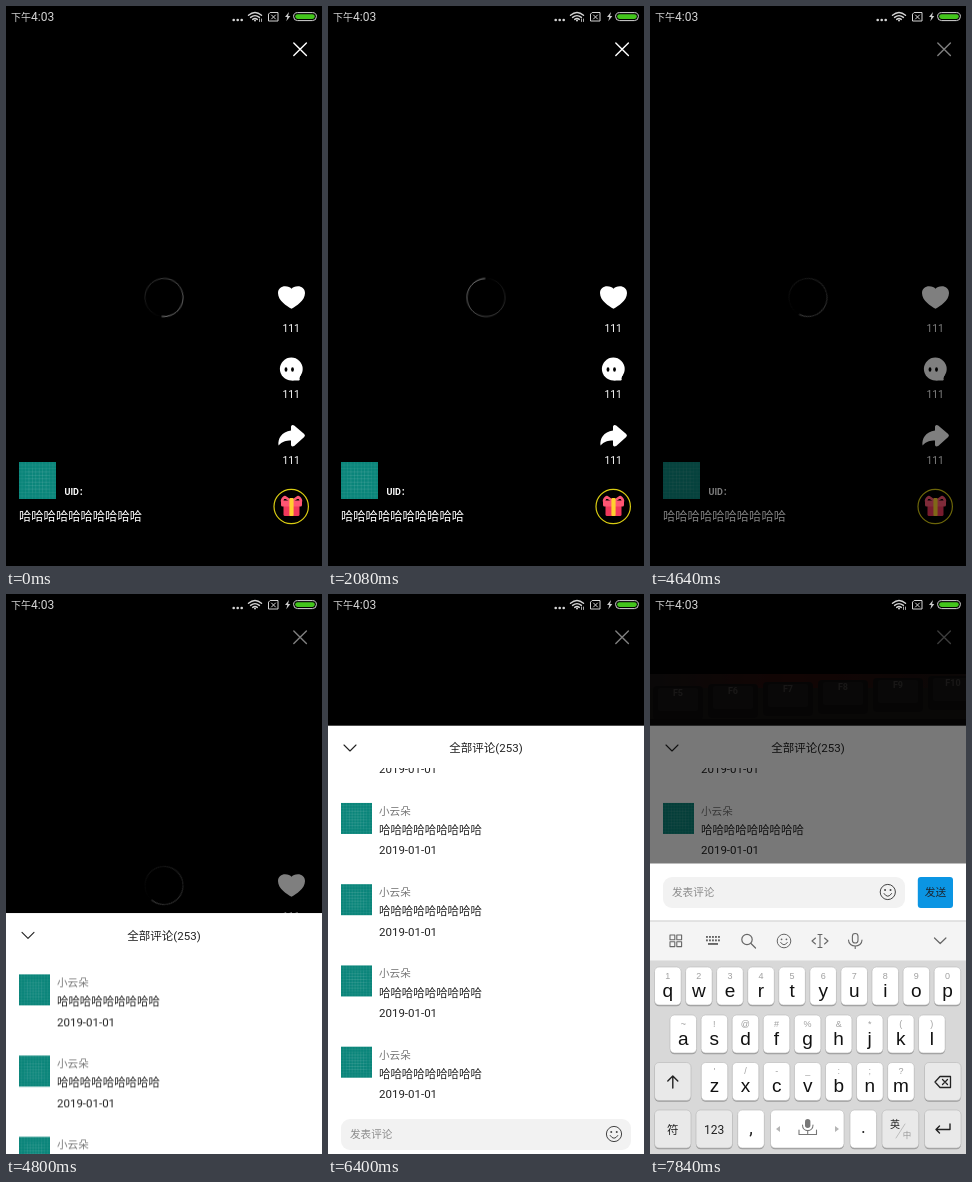
Animation, 316 px wide and 560 px high, one loop 8000 ms. Source, as an HTML page:

```html
<!DOCTYPE html>
<html lang="zh">
<head>
<meta charset="utf-8">
<title>Comments sheet</title>
<style>
html, body { margin: 0; width: 100%; height: 100%; overflow: hidden; background: #000; }
svg { display: block; width: 100%; height: 100%; }
text { font-family: Roboto, "Noto Sans CJK SC", "Noto Sans CJK", sans-serif; white-space: pre; }
.letters text { font-family: "Liberation Sans", sans-serif; }
.line { fill: none; stroke-linecap: round; stroke-linejoin: round; }
.spinner, .dim1, .dim2, .sheet, .list, .viewport, .panel, .keyboard, .caret, .video, .dots, .traffic {
  animation: 8s linear infinite;
}
.spinner { animation-name: spin; transform-origin: 158px 291.5px; }
.dim1 { animation-name: dim1; }
.sheet { animation-name: sheet; }
.list { animation-name: scroll; }
.viewport { animation-name: nudge; }
.keyboard { animation-name: keyboard; }
.dim2, .panel { animation-name: compose; }
.caret { animation-name: caret; }
.video { animation-name: video; }
.dots { animation-name: dots; }
.traffic { animation-name: traffic; }
@keyframes spin { from { transform: rotate(97deg); } to { transform: rotate(753deg); } }
@keyframes dim1 { 0%, 56.5% { opacity: 0; } 57.8%, 100% { opacity: .5; } }
@keyframes sheet {
  0%, 58.3% { transform: translateY(432px); animation-timing-function: cubic-bezier(.2, .6, .4, 1); }
  65.5%, 100% { transform: none; }
}
@keyframes scroll {
  0%, 72% { transform: none; animation-timing-function: cubic-bezier(.3, .2, .5, 1); }
  80%, 100% { transform: translateY(-65.3px); }
}
@keyframes nudge {
  0%, 85% { transform: none; }
  85.9%, 86.2% { transform: translateY(2.5px); }
  88%, 100% { transform: none; }
}
@keyframes compose {
  0% { visibility: hidden; animation-timing-function: step-end; }
  85.9%, 100% { visibility: visible; }
}
@keyframes keyboard {
  0%, 86% { transform: translateY(70px); animation-timing-function: ease-out; }
  88.5%, 100% { transform: none; }
}
@keyframes caret {
  0%, 85.9% { opacity: 1; }
  92.2% { opacity: 1; animation-timing-function: step-end; }
  92.25%, 100% { opacity: 0; }
}
@keyframes video {
  0% { visibility: hidden; animation-timing-function: step-end; }
  97%, 100% { visibility: visible; }
}
@keyframes dots {
  0% { visibility: visible; animation-timing-function: step-end; }
  82%, 100% { visibility: hidden; }
}
@keyframes traffic {
  0% { visibility: visible; animation-timing-function: step-end; }
  46% { visibility: hidden; animation-timing-function: step-end; }
  71%, 100% { visibility: visible; }
}
</style>
</head>
<body>
<svg id="stage" viewBox="0 0 316 560"></svg>
<script>
const range = n => [...Array(n).keys()];
const each = (list, draw) => [...list].map(draw).join('');
const rect = (x, y, w, h, fill, r = 0, extra = '') =>
  `<rect x="${x}" y="${y}" width="${w}" height="${h}" rx="${r}" fill="${fill}" ${extra}/>`;
const circle = (x, y, r, fill, extra = '') =>
  `<circle cx="${x}" cy="${y}" r="${r}" fill="${fill}" ${extra}/>`;
const line = (d, color, width = 1.2) =>
  `<path class="line" d="${d}" stroke="${color}" stroke-width="${width}"/>`;
const ring = (x, y, r, color, width = 1.2) =>
  circle(x, y, r, 'none', `stroke="${color}" stroke-width="${width}"`);
// y is the vertical middle of the glyphs
const text = (x, y, size, fill, str, anchor = 'start', weight = 400) =>
  `<text x="${x}" y="${y + size * .37}" font-size="${size}" fill="${fill}" text-anchor="${anchor}" font-weight="${weight}">${str.replace('&', '&amp;')}</text>`;
const group = (name, body) => `<g class="${name}">${body}</g>`;

function avatar(x, y, size) {
  const at = i => (9 + i * 10) / 108 * size;
  const grid = (from, to, a, b) => each(range(to - from + 1), i => {
    const p = at(i + from);
    return `M${x + p} ${y + a}V${y + b}M${x + a} ${y + p}H${x + b}`;
  });
  return rect(x, y, size, size, '#0a857a') +
    `<path d="${grid(0, 9, 0, size)}" stroke="#fff" stroke-opacity=".1" stroke-width=".5"/>` +
    `<path d="${grid(2, 7, at(1), at(8))}" stroke="#fff" stroke-opacity=".1" stroke-width=".5"/>`;
}

const smile = (x, y, r, color) => ring(x, y, r, color, 1) +
  circle(x - r * .36, y - r * .25, r * .13, color) + circle(x + r * .36, y - r * .25, r * .13, color) +
  line(`M${x - r * .5} ${y + r * .2}q${r * .5} ${r * .75} ${r} 0`, color, 1);

function spinner() {
  const n = 72, r = 19;
  const point = a => `${158 + r * Math.cos(a)} ${291.5 + r * Math.sin(a)}`;
  return group('spinner', each(range(n), i => {
    const a = -i / n * 2 * Math.PI, b = a - 2 * Math.PI / n;
    return `<path d="M${point(a)}A${r} ${r} 0 0 0 ${point(b)}" fill="none" stroke="#fff" stroke-width="1" stroke-opacity="${.55 * (1 - i / n)}"/>`;
  }));
}

function video() {
  return group('video',
    rect(0, 80, 316, 52, '#2a2220') + rect(0, 80, 316, 14, 'url(#glow)') +
    each(range(6), i => {
      const x = 28 + i * 55, y = 92 - i * 2;
      return rect(x - 25, y, 50, 34, '#1c1919', 4) + rect(x - 20, y + 2, 40, 23, '#2a2726', 3) +
        text(x, y + 7, 9, '#6a6462', 'F' + (i + 5), 'middle', 700);
    }) + rect(0, 125, 316, 7, '#171414'));
}

const gift = () => ring(285.2, 500.5, 17.2, '#d9cc12', 1.2) +
  line('M285.5 495.500l-6.500-4.500q-2.500 1-3 4M285.500 495.500l6.500-4.500q2.500 1 3 4', '#ff5673', 2.6) +
  rect(277.5, 499, 16, 11, '#f2385c', 1.5) +
  rect(275, 494.5, 21, 6, '#ff5673', 1.5) +
  rect(283.4, 492, 4.2, 18, '#ffd02e', 1);

const actions = () =>
  line('M287.8 37l12.6 12.6M300.4 37l-12.6 12.6', '#fff', 1.4) +
  '<path d="M285.5 302.800C281 300 272 295 272 287C272 282.500 275.500 280.200 279 280.200C282 280.200 284.500 281.300 285.500 282.800C286.500 281.300 289 280.200 292 280.200C295.500 280.200 299 282.500 299 287C299 295 290 300 285.500 302.800Z" fill="#fff"/>' +
  circle(285.3, 363, 11.4, '#fff') +
  '<path d="M285.300 374.400H293q1.300-.5.500-2l1-4z" fill="#fff"/>' +
  each([280, 286.5], x => `<ellipse cx="${x}" cy="363.500" rx="1.400" ry="2.200" fill="#000"/>`) +
  '<path d="M285 420.500q1-2.300 3.200-1l10 8.500q1.500 1.500 0 3l-10 9q-3 1.300-3.200-1v-4.500c-5 0-9 1-12.500 5c-.8-7 3-13.500 12.500-15z" fill="#fff"/>' +
  each([322, 388, 454], y => text(285.2, y, 10.3, '#fff', '111', 'middle')) +
  gift();

const profile = () => avatar(13, 456, 37) +
  text(58.5, 486, 9, '#fff', 'UID：', 'start', 700) +
  text(13, 510, 12.3, '#fff', '哈'.repeat(10));

const comment = i => {
  const y = 193 + i * 81.25;
  return avatar(13, y, 31) + text(51, y + 8, 10.6, '#777', '小云朵') +
    text(51, y + 27, 11.45, '#222', '哈'.repeat(9)) +
    text(51, y + 47.3, 11.5, '#222', '2019-01-01');
};

const sheet = () => group('sheet',
  rect(0, 131.7, 316, 429, '#fff') +
  line('M16 151l6 6l6-6', '#222', 1.1) +
  text(158, 154, 11.5, '#222', '全部评论(253)', 'middle') +
  group('viewport', `<g clip-path="url(#listArea)">${group('list', each(range(6), comment))}</g>`) +
  rect(13, 525, 290, 31, '#f2f2f2', 9) +
  text(22, 540.5, 10.6, '#8c8c8c', '发表评论') + smile(286, 540, 7.6, '#444'));

const key = (x, y, w, fill = '#fff') =>
  rect(x, y + 1.2, w, 38, '#9c9c9c', 4.5) + rect(x, y, w, 38, fill, 4.5, 'stroke="#b8b8b8" stroke-width=".6"');

const letters = (chars, hints, x0, y) => group('letters', each(chars, (c, i) => {
  const x = x0 + i * 31.07;
  return key(x - 13.3, y, 26.6) + text(x, y + 8.2, 9, '#a0a0a0', hints[i], 'middle') +
    text(x, y + 22.5, 19, '#111', c, 'middle');
}));

function toolbar() {
  const c = '#666';
  return rect(0, 326.5, 316, 40, '#f4f4f4') + rect(0, 326.5, 316, 1, '#cfcfcf') +
    each(range(4), i => `<rect x="${20 + i % 2 * 6.8}" y="${341 + (i >> 1) * 6.8}" width="4.800" height="4.800" class="line" stroke="${c}" stroke-width="1.100"/>`) +
    each(range(10), i => rect(56 + i % 5 * 3, 342 + (i / 5 | 0) * 3.4, 1.9, 1.9, c)) + rect(58, 349, 10, 1.9, c) +
    ring(97, 345.5, 5.2, c) + line('M101 349.500l4.500 4.500', c) +
    smile(134, 347, 6.8, c) +
    line('M168 340.500h4M170 340.500v13M168 353.500h4M165.500 344l-3.500 3l3.500 3M174.500 344l3.500 3l-3.500 3', c, 1.1) +
    `<rect x="202.400" y="339.500" width="5.600" height="9.500" rx="2.800" class="line" stroke="${c}" stroke-width="1.100"/>` +
    line('M198.500 346c0 8 13.500 8 13.500 0M205.200 352v2.500', c, 1.1) +
    line('M284.500 344l5.700 5.500l5.700-5.500', c, 1.2);
}

function keyboard() {
  const gray = '#e9e9e9', ink = '#222';
  return group('keyboard',
    rect(0, 365, 316, 195, '#d8d8d8') + toolbar() +
    letters('qwertyuiop', '1234567890', 17.8, 373) +
    letters('asdfghjkl', '~!@#%&*()', 33.3, 421) +
    letters('zxcvbnm', "'/-_:;?", 64.5, 468.5) +
    key(4.5, 468.5, 36.5, gray) + line('M22.800 494v-12M17.800 487l5-5l5 5', ink, 1.4) +
    key(274.5, 468.5, 36.5, gray) +
    line('M285 488l5-5.500h10.500v11h-10.500zM292.500 485.500l5 5M297.500 485.500l-5 5', ink, 1.3) +
    key(4.5, 516, 36.5, gray) + text(22.8, 535.5, 11.5, ink, '符', 'middle') +
    key(46, 516, 36.5, gray) + text(64.2, 535.5, 12, ink, '123', 'middle') +
    key(87.7, 516, 26.6) + text(101, 533, 18, ink, ',', 'middle') +
    key(120.5, 516, 73.5) +
    rect(155, 525, 5.4, 9, '#777', 2.7) +
    line('M152.500 531c0 7.500 10.500 7.500 10.500 0M157.700 537v2.500M149 536v4.500h17.500v-4.500', '#777', 1.1) +
    '<path d="M130 532v6l-4-3zM185 532v6l4-3z" fill="#b5b5b5"/>' +
    key(200, 516, 26.6) + text(213.3, 532, 18, ink, '.', 'middle') +
    key(232, 516, 36.8, gray) + text(245, 530, 10, ink, '英', 'middle') +
    text(257, 541, 8.5, '#999', '中', 'middle') + line('M246 544l9-14', '#aaa', .7) +
    key(274.5, 516, 36.5, gray) + line('M300 530v5.500h-14M289.500 532l-3.500 3.500l3.500 3.500', ink, 1.4));
}

const panel = () => group('panel',
  rect(0, 269.5, 316, 291, '#fff') +
  rect(13, 283, 242, 31, '#f2f2f2', 9) +
  text(22, 298.5, 10.6, '#8c8c8c', '发表评论') +
  smile(237.8, 298, 7.6, '#444') +
  rect(267.8, 283, 35.2, 31, '#0b95e3', 3) + text(285.4, 298.5, 10.7, '#1b2530', '发送', 'middle') +
  group('caret', rect(22.2, 290.5, 1.4, 15.5, '#d81b60')) +
  keyboard());

const statusBar = () => {
  const c = '#d4d4d4';
  return text(5, 11, 10, c, '下午') + text(25, 11, 12, c, '4:03') +
    group('dots', each([227.7, 231.7, 235.7], x => circle(x, 14, 1.3, c))) +
    line('M242.500 9.200q6.500-5.400 13 0M244.600 11.400q4.400-3.600 8.800 0M246.700 13.400q2.300-1.800 4.600 0', c, 1.4) +
    circle(249, 14.6, 1, c) +
    group('traffic', line('M253.500 13v2.500M255.500 13v2.500', c, .8)) +
    line('M264.500 6.500h7.500v8.500h-9.500v-6.500zM265.500 9l4 4M269.500 9l-4 4', c, 1) +
    '<path d="M283 6l-4 5h2.300l-1 4.200l4-5.200h-2.200z" fill="#ccc"/>' +
    rect(287.6, 6.6, 22.8, 8, '#000', 4, `stroke="${c}" stroke-width="1"`) +
    rect(289.2, 8.2, 19.6, 4.8, '#43c51c', 2.4);
};

const defs = `<defs>
  <clipPath id="listArea"><rect y="174.500" width="316" height="344.500"/></clipPath>
  <linearGradient id="glow"><stop stop-color="#2c2624"/><stop offset=".45" stop-color="#501612"/><stop offset="1" stop-color="#30201e"/></linearGradient>
</defs>`;

const dim = name => group(name, rect(0, 0, 316, 560, '#000'));
const composeDim = `<g opacity=".53">${dim('dim2')}</g>`;

document.getElementById('stage').innerHTML = defs + video() + spinner() + actions() + profile() +
  dim('dim1') + sheet() + composeDim + panel() + statusBar();
</script>
</body>
</html>
```
